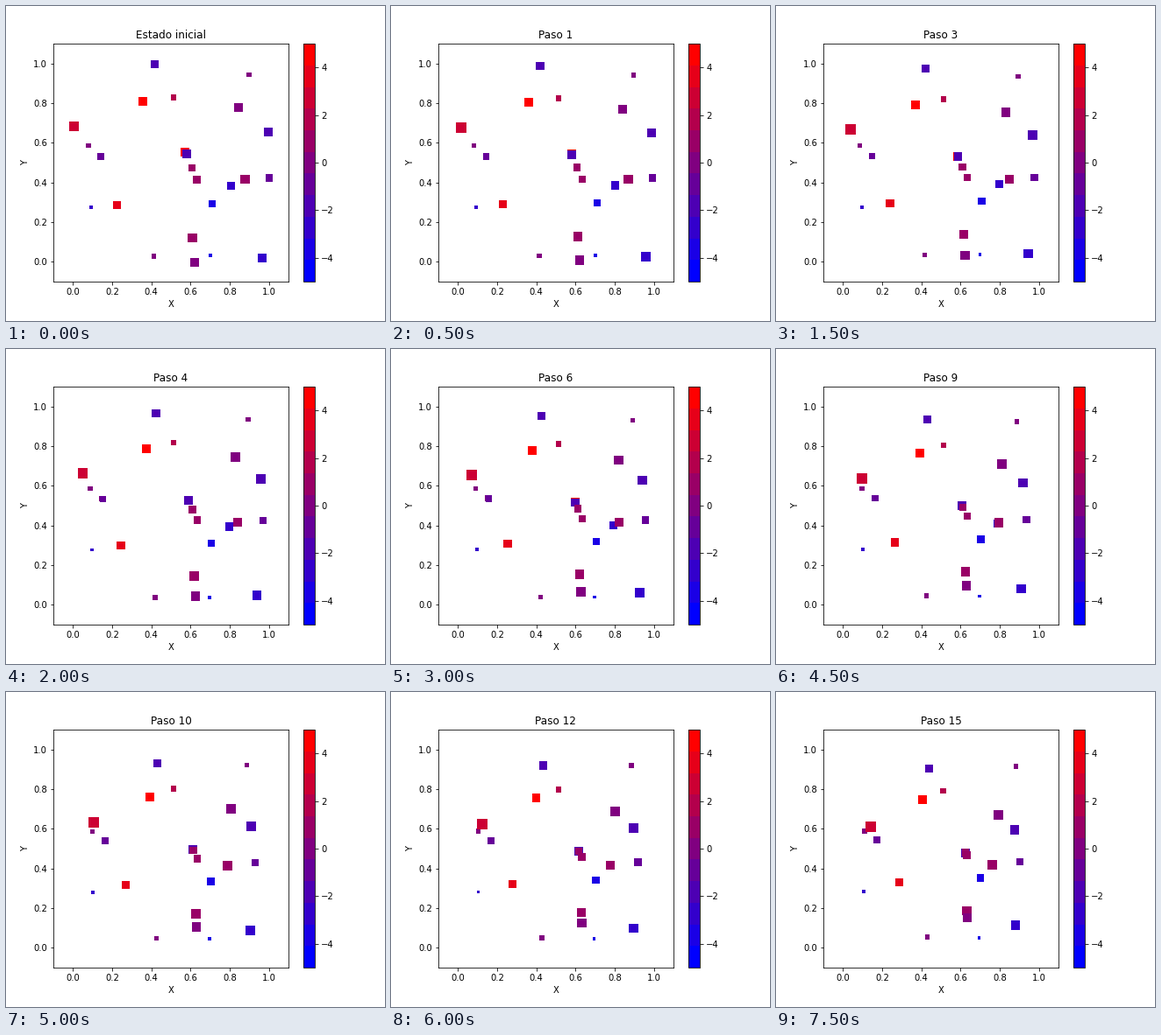
Recreate the animation shown at these times as a matplotlib script. Size 432 px wide and 360 px high, loop 8 s.

```python
import numpy as np
import matplotlib.pyplot as plt
from matplotlib.animation import FuncAnimation
from matplotlib.colors import LinearSegmentedColormap

STEPS, INTERVAL = 16, 500
PULL, SLOWING, SOFTENING = 6.9e-6, 0.95, 0.0012
plt.rcParams["font.family"] = "DejaVu Sans"

# Initial state: x, y, mass, charge (later rows are drawn on top)
BODIES = np.array([
    (0.079, 0.586, 2, 0), (0.005, 0.684, 10, 3), (0.140, 0.535, 3, 0),
    (0.141, 0.531, 4, -1), (0.092, 0.275, 1, -3), (0.225, 0.286, 6, 4),
    (0.357, 0.809, 7, 5), (0.418, 0.997, 6, -2), (0.514, 0.829, 3, 2),
    (0.899, 0.944, 2, 0), (0.845, 0.779, 8, 0), (0.998, 0.655, 8, -2),
    (1.002, 0.423, 5, -1), (0.807, 0.383, 6, -3), (0.879, 0.417, 8, 1),
    (0.711, 0.293, 5, -4), (0.574, 0.553, 7, 5), (0.581, 0.545, 7, -2),
    (0.608, 0.474, 5, 1), (0.633, 0.414, 5, 1), (0.610, 0.121, 8, 1),
    (0.621, -0.003, 8, 0), (0.413, 0.028, 2, 0), (0.702, 0.032, 1, -4),
    (0.966, 0.019, 8, -3),
])
start, mass, charge = BODIES[:, :2], BODIES[:, 2], BODIES[:, 3]


def attraction(pos):
    """Mutual pull of all bodies, falling off with 1/r."""
    gap = pos[None, :, :] - pos[:, None, :]
    dist2 = (gap ** 2).sum(axis=2) + SOFTENING
    weight = mass[:, None] * mass[None, :] / dist2
    return (weight[:, :, None] * gap).sum(axis=1)


path = [start]
for n in range(STEPS - 1):
    path.append(path[-1] + PULL * SLOWING ** n * attraction(path[-1]))

fig, ax = plt.subplots(figsize=(6, 5), dpi=72, facecolor="white")
fig.subplots_adjust(left=0.125, right=0.9, bottom=0.125, top=0.88)
ax.set(xlim=(-0.1, 1.1), ylim=(-0.1, 1.1), xlabel="X", ylabel="Y")
ax.set_xticks(np.arange(0, 1.1, 0.2))
ax.set_yticks(np.arange(0, 1.1, 0.2))
title = ax.set_title("Estado inicial", fontsize=12)

cmap = LinearSegmentedColormap.from_list("charge", ["blue", "red"], N=11)
dots = ax.scatter(start[:, 0], start[:, 1], s=14 * mass, c=charge, marker="s",
                  cmap=cmap, vmin=-5, vmax=5, linewidths=0)
fig.colorbar(dots, ax=ax, ticks=[-4, -2, 0, 2, 4])


def update(step):
    dots.set_offsets(path[step])
    title.set_text(f"Paso {step}" if step else "Estado inicial")
    return dots, title


anim = FuncAnimation(fig, update, frames=STEPS, interval=INTERVAL,
                     repeat=True, repeat_delay=0, blit=False)
plt.show()
```
